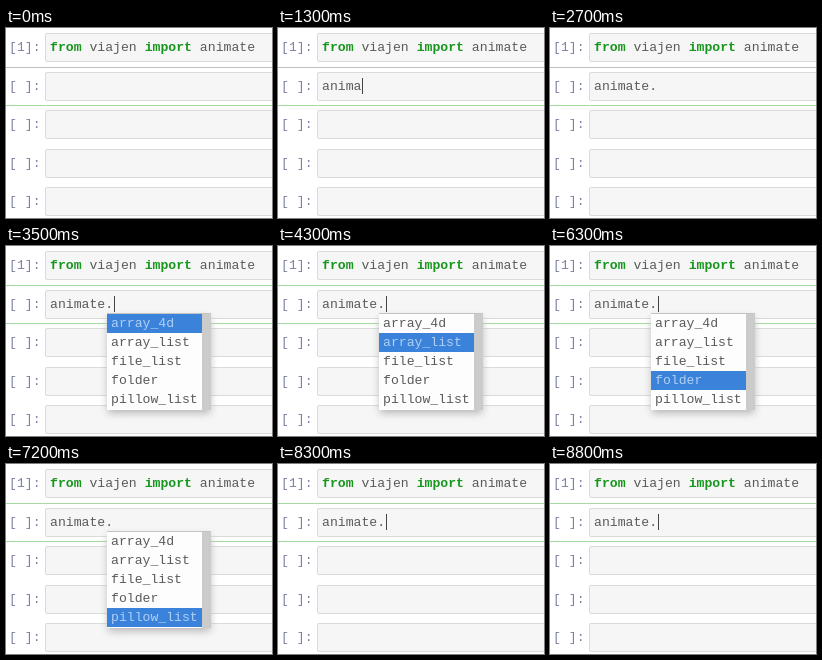
Write an HTML page that moves like this. It is 266 px wide and 190 px high and loops after 9 s.

```html
<!DOCTYPE html>
<html lang="en">
<head>
<meta charset="utf-8">
<title>Notebook completion</title>
<style>
html, body { margin: 0; width: 100%; height: 100%; overflow: hidden; background: #fff; }
#stage { position: relative; width: 266px; height: 190px; overflow: hidden;
  font: 13.15px/19px "Liberation Mono", "Courier New", monospace; color: #5a5a5a; white-space: pre; }
#stage div { position: absolute; box-sizing: border-box; }
.box { left: 39px; width: 240px; height: 29px; background: #f6f6f6; border: 1px solid #dadada; border-radius: 2px; }
.prompt { left: 3px; color: #7c81a6; }
.code { left: 44px; }
b { color: #17961d; }
.rule { left: 0; width: 266px; height: 1px; background: #a6dba0; }
#caret { top: 50px; width: 1px; height: 16px; background: #444; }
#menu { left: 101px; top: 67px; width: 104px; height: 97px; padding-top: 1px; background: #fdfdfd;
  border-top: 1px solid #c4c4c4; box-shadow: 0 4px 8px -1px #b4b4b4; }
#menu .bar { right: 0; width: 9px; height: 96px; background: #cbcbcb; }
.item { left: 0; width: 95px; height: 19px; padding-left: 4px; }
.item.on { background: #3b82da; color: #b0d0f4; }
</style>
</head>
<body>
<div id="stage"></div>
<script>
const stage = document.getElementById("stage");
const LOOP = 9000, TICK = 100, BLINK = 262, CHAR = 7.89, ROW = 19;
const WORD = "animate.";

function add(cls, top, html = "", parent = stage) {
  const el = document.createElement("div");
  el.className = cls;
  el.style.top = top + "px";
  el.innerHTML = html;
  parent.append(el);
  return el;
}

for (let i = 0; i < 5; i++) {
  const y = Math.round(5 + i * 38.5);
  add("box", y);
  add("prompt", y + 5, i ? "[ ]:" : "[1]:");
}
add("code", 10, "<b>from</b> viajen <b>import</b> animate");
const topRule = add("rule", 39);
add("rule", 77);
const typed = add("code", 49);
const caret = add("", 50);
caret.id = "caret";

const menu = add("", 67);
menu.id = "menu";
const items = ["array_4d", "array_list", "file_list", "folder", "pillow_list"]
  .map((name, i) => add("item", i * ROW, name, menu));
add("bar", 0, "", menu);

// Each key press: time, typed length, selected item (-1 = menu closed)
const keys = [
  [30, 0, -1], [590, 1, -1], [720, 2, -1], [850, 3, -1],
  [1090, 4, -1], [1290, 5, -1], [1590, 6, -1], [1690, 7, -1], [1910, 8, -1],
  [2820, 8, 0], [3520, 8, 1], [4320, 8, 2], [5120, 8, 3], [6390, 8, 4], [7220, 8, -1]
];

function draw(now) {
  const t = Math.floor((now % LOOP) / TICK) * TICK;
  const [at, len, pick] = keys.findLast(k => k[0] <= t) || [0, 0, -1];
  const lit = t > 0 && Math.floor((t - at) / BLINK) % 2 === 0;
  typed.textContent = WORD.slice(0, len);
  caret.style.left = Math.round(44.5 + len * CHAR) + "px";
  caret.style.visibility = lit ? "visible" : "hidden";
  menu.style.visibility = pick < 0 ? "hidden" : "visible";
  items.forEach((el, i) => el.classList.toggle("on", i === pick));
  topRule.style.background = t < 2900 ? "#bcc4c0" : "#a6dba0";
}

const start = performance.now();
function frame() {
  draw(performance.now() - start);
  requestAnimationFrame(frame);
}
frame();
</script>
</body>
</html>
```
